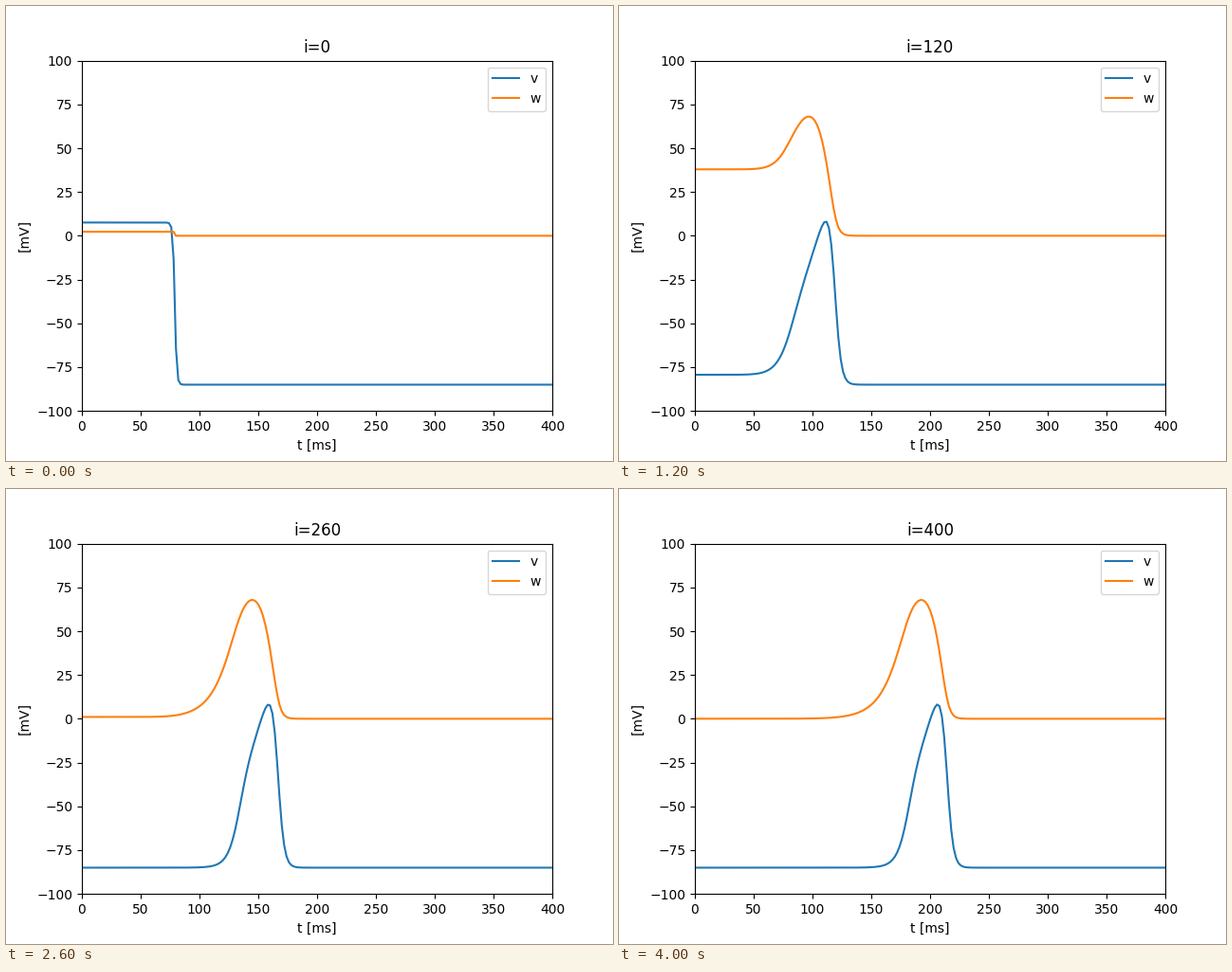
A matplotlib script for the animation above (4.2 s loop, 640 by 480 pixels).

```python
import numpy as np
import matplotlib.pyplot as plt
from matplotlib.animation import FuncAnimation

# Excitable cable: cubic reaction kinetics with a slow recovery variable
V_REST, V_PEAK = -85.0, 40.0
V_AMP = V_PEAK - V_REST
V_TH = V_REST + 0.13 * V_AMP
B, C1, C2 = 0.013, 0.26, 0.1
DIFFUSION = 0.66
DX, DT = 2.0, 2.0
FRAMES, STEPS_PER_FRAME, INTERVAL = 21, 20, 200


def kinetics(state):
    v, w = state
    u = v - V_REST
    dv = C1 / V_AMP**2 * u * (v - V_TH) * (V_PEAK - v) - C2 / V_AMP * u * w
    return np.array([dv, B * (u - w)])


def react(state):
    """One Runge-Kutta step of the local kinetics."""
    k1 = kinetics(state)
    k2 = kinetics(state + DT / 2 * k1)
    k3 = kinetics(state + DT / 2 * k2)
    k4 = kinetics(state + DT * k3)
    return state + DT / 6 * (k1 + 2 * k2 + 2 * k3 + k4)


def diffusion_matrix(n):
    """Crank-Nicolson step with sealed ends."""
    lap = np.eye(n, k=1) + np.eye(n, k=-1) - 2 * np.eye(n)
    lap[0, 0] = lap[-1, -1] = -1
    half = DIFFUSION * DT / DX**2 / 2 * lap
    return np.linalg.solve(np.eye(n) - half, np.eye(n) + half)


def simulate(x):
    spread = diffusion_matrix(len(x))
    state = np.array([np.where(x < 80, 0.0, V_REST), np.zeros(len(x))])
    snapshots = []
    for i in range((FRAMES - 1) * STEPS_PER_FRAME + 1):
        state = react(state)
        state[0] = spread @ state[0]
        if i % STEPS_PER_FRAME == 0:
            snapshots.append(state.copy())
    return snapshots


x = np.arange(0, 400 + DX, DX)
snapshots = simulate(x)

fig, ax = plt.subplots(figsize=(6.4, 4.8), dpi=100)
lines = [ax.plot(x, values, label=name)[0]
         for name, values in zip("vw", snapshots[0])]
ax.set(xlim=(0, 400), ylim=(-100, 100), xlabel="t [ms]", ylabel="[mV]")
ax.legend(loc="upper right")
title = ax.set_title("i=0")


def update(frame):
    for line, values in zip(lines, snapshots[frame]):
        line.set_ydata(values)
    title.set_text(f"i={frame * STEPS_PER_FRAME}")
    return [*lines, title]


anim = FuncAnimation(fig, update, frames=FRAMES, interval=INTERVAL,
                     repeat=True, repeat_delay=0)
plt.show()
```
